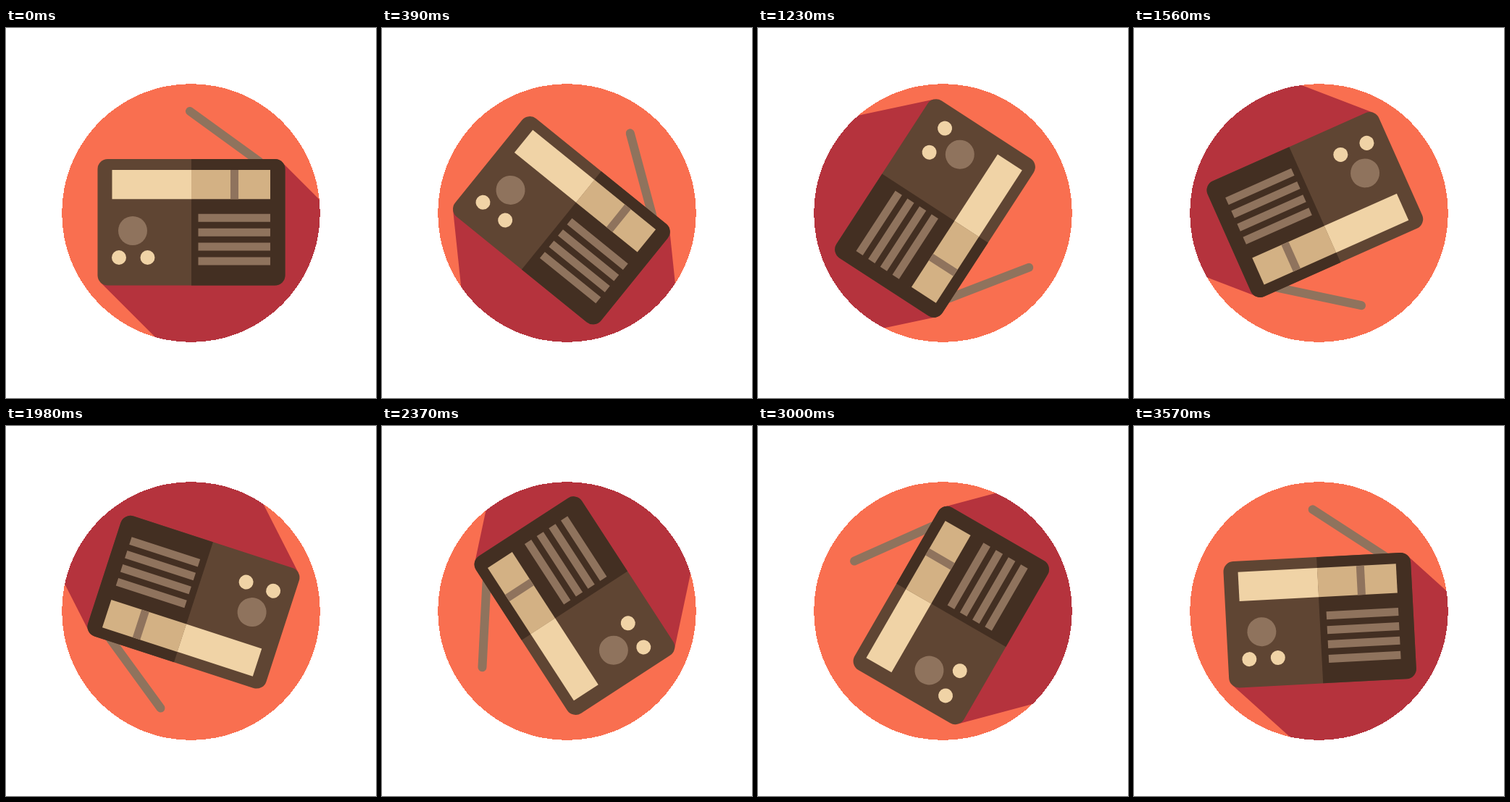
These frames come from a looping animation (511 px wide and 511 px high, 3.6 s). An HTML page:

```html
<!DOCTYPE html>
<html lang="en">
<head>
<meta charset="utf-8">
<title>Turning radio</title>
<style>
  html, body { margin: 0; width: 100%; height: 100%; overflow: hidden; background: #fff; }
  svg { display: block; width: 100vw; height: 100vh; }
</style>
</head>
<body>
<svg viewBox="0 0 511 511">
  <defs>
    <clipPath id="right"><rect x="256" y="170" width="140" height="200"/></clipPath>
  </defs>
  <rect x="60" y="60" width="391" height="391" fill="#f96f50"/>
  <g id="radio">
    <path d="M381.4 185.6L581.4 385.6V600H379.2L130.6 351.4L250 250Z" fill="#b5333d"/>
    <path d="M254 115L350 184.6" stroke="#8f735d" stroke-width="12" stroke-linecap="round"/>
    <rect x="126.5" y="181" width="259" height="174.5" rx="14" fill="#5f4533"/>
    <rect x="126.5" y="181" width="259" height="174.5" rx="14" fill="#432f22" clip-path="url(#right)"/>
    <rect x="146.5" y="196" width="109.7" height="40.3" fill="#f0d3a6"/>
    <rect x="256" y="196" width="109" height="40.3" fill="#d3b184"/>
    <g fill="#8f735d">
      <rect x="310" y="196" width="11" height="40.3"/>
      <circle cx="175" cy="280" r="20"/>
      <path id="grille"/>
    </g>
    <g fill="#f0d3a6">
      <circle cx="156" cy="317" r="10"/>
      <circle cx="195.5" cy="317" r="10"/>
    </g>
  </g>
  <path d="M0 0H511V511H0ZM77.2 255.5a178.3 178.3 0 1 0 356.6 0a178.3 178.3 0 1 0 -356.6 0Z"
        fill="#fff" fill-rule="evenodd" shape-rendering="crispEdges"/>
</svg>
<script>
  const LOOP = 3600, STEP = 30, MID = 255.5;
  const radio = document.getElementById('radio');

  document.getElementById('grille').setAttribute('d',
    [0, 1, 2, 3].map(i => `M265.5 ${256.8 + i * 19.9}h99.5v11h-99.5z`).join(''));

  // One full clockwise turn per loop, in 3 degree steps
  function draw(ms) {
    const angle = Math.floor((ms % LOOP) / STEP) * STEP * 360 / LOOP;
    radio.setAttribute('transform', `rotate(${angle} ${MID} ${MID})`);
  }

  const start = performance.now();
  function tick() {
    draw(performance.now() - start);
    requestAnimationFrame(tick);
  }
  draw(0);
  requestAnimationFrame(tick);
</script>
</body>
</html>
```
